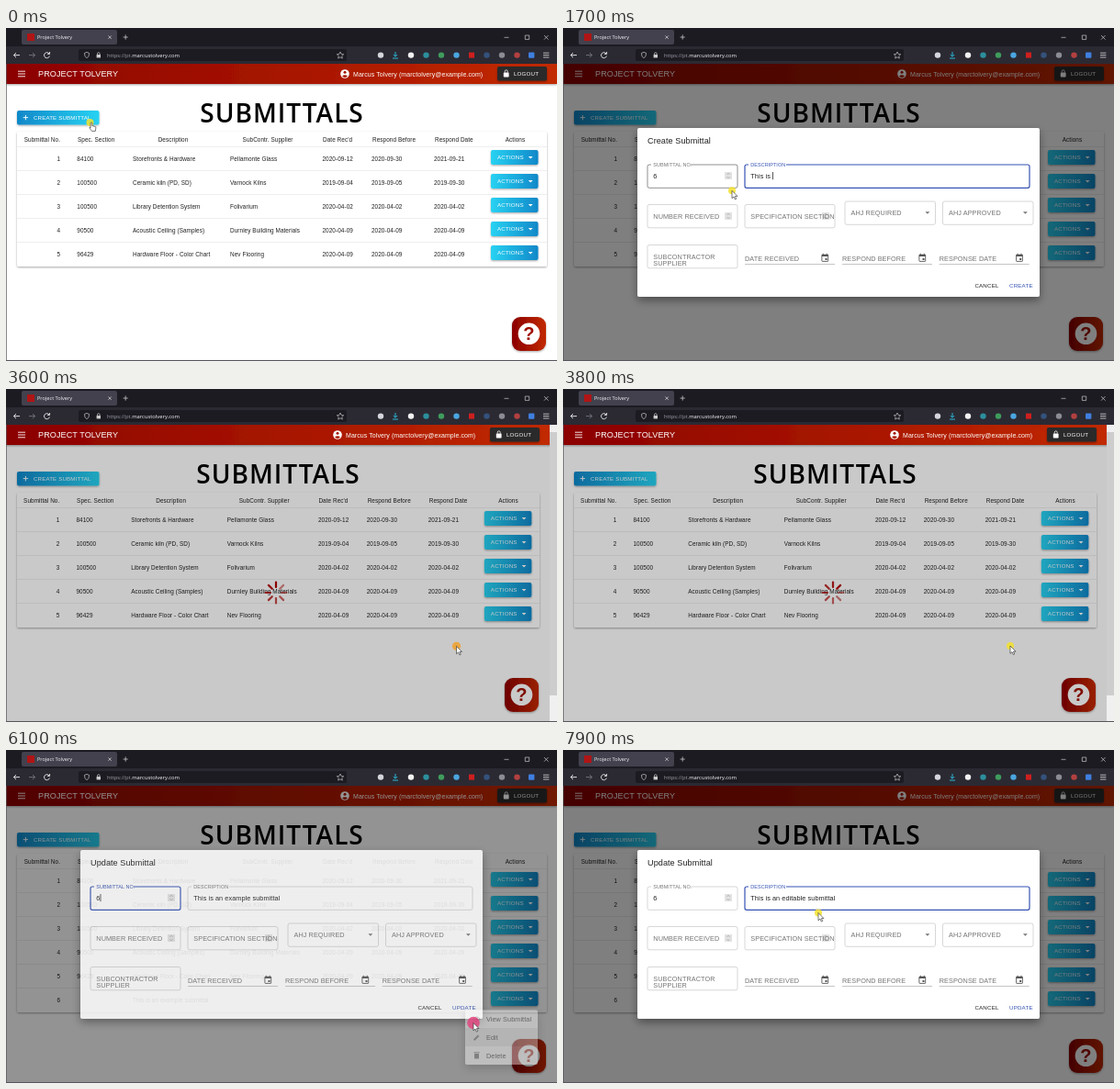
Animation, 600 px wide and 363 px high, one loop 8 s. Source, as an HTML page:

```html
<!DOCTYPE html>
<html lang="en">
<head>
<meta charset="utf-8">
<title>Submittals</title>
<style>
  html, body { margin: 0; width: 100%; height: 100%; overflow: hidden; background: #fff; }
  svg { display: block; width: 600px; height: 363px; }
  text { font-family: "Liberation Sans", Arial, sans-serif; white-space: pre; letter-spacing: .07px; }
  .chrome { font-family: "Open Sans", "Noto Sans", sans-serif; letter-spacing: 0; }
  .btn { letter-spacing: .18px; }
  .heading { font-family: "Open Sans", "Noto Sans", sans-serif; font-weight: 600; letter-spacing: 1px; }
</style>
</head>
<body>
<svg id="stage" viewBox="0 0 600 363">
  <defs>
    <linearGradient id="red"><stop stop-color="#8b0000"/><stop offset="1" stop-color="#c22a00"/></linearGradient>
    <linearGradient id="cyanBlue"><stop stop-color="#28d2f2"/><stop offset="1" stop-color="#1088c9"/></linearGradient>
    <linearGradient id="blueCyan"><stop stop-color="#1088c9"/><stop offset="1" stop-color="#28d2f2"/></linearGradient>
    <filter id="soft" x="-20%" y="-20%" width="140%" height="150%">
      <feDropShadow dx="0" dy="1" stdDeviation="1" flood-opacity=".35"/>
    </filter>
    <filter id="deep" x="-20%" y="-20%" width="140%" height="150%">
      <feDropShadow dx="0" dy="4" stdDeviation="5" flood-opacity=".4"/>
    </filter>
  </defs>
</svg>
<script>
const LOOP = 8000, STEP = 100;
const BLUE = '#3552b3', GREY = '#757575', INK = '#212121';
const stage = document.getElementById('stage');

function set(node, attrs) {
  for (const k in attrs) node.setAttribute(k, attrs[k]);
  return node;
}
function el(parent, tag, attrs = {}) {
  return parent.appendChild(set(document.createElementNS('http://www.w3.org/2000/svg', tag), attrs));
}
const group = (parent, attrs) => el(parent, 'g', attrs);
const box = (parent, x, y, width, height, fill, more) =>
  el(parent, 'rect', { x, y, width, height, fill, ...more });
const dot = (parent, cx, cy, r, fill, more) => el(parent, 'circle', { cx, cy, r, fill, ...more });
const path = (parent, d, stroke, width = 1, more) =>
  el(parent, 'path', { d, stroke, 'stroke-width': width, fill: 'none', ...more });
function label(parent, x, y, str, size, fill, more) {
  const t = el(parent, 'text', { x, y, 'font-size': size, fill, ...more });
  t.textContent = str;
  return t;
}
const show = (node, on) => node.setAttribute('visibility', on ? 'visible' : 'hidden');
const move = (node, x, y = 0) => node.setAttribute('transform', `translate(${x} ${y})`);
const MID = { 'text-anchor': 'middle' }, END = { 'text-anchor': 'end' };

const clamp = v => Math.max(0, Math.min(1, v));
const ramp = (t, from, to) => clamp((t - from) / (to - from));
const smooth = u => u * u * (3 - 2 * u);
const fade = (t, from, to) => smooth(ramp(t, from, to));
const mix = (a, b, u) => a + (b - a) * u;

// ---- page -------------------------------------------------------------
box(stage, 0, 0, 600, 363, '#fff');
const page = group(stage);
const heading = label(page, 300.5, 103, 'SUBMITTALS', 28, '#000', { class: 'heading', ...MID });

const create = group(page);
box(create, 12, 90, 89.5, 15.5, 'url(#blueCyan)', { rx: 2, filter: 'url(#soft)' });
path(create, 'M18.7 97.6h5.4M21.4 94.9v5.4', '#fff', .9);
label(create, 30, 100, 'CREATE SUBMITTAL', 6.1, '#fff', { class: 'btn' });

const sheet = box(page, 12, 113, 577, 147, '#fff', { rx: 2, filter: 'url(#soft)' });
const rules = Array.from({ length: 6 }, (_, i) => box(page, 12, 129.3 + i * 26, 577, .5, '#dcdcdc'));

const shifting = [];
function cell(parent, x, y, str, more) {
  shifting.push([x, label(parent, x, y, str, 6.4, INK, more)]);
}
[[59, 'Submittal No.', END], [78, 'Spec. Section'], [182, 'Description', MID], [285, 'SubContr. Supplier', MID],
 [345, "Date Rec'd"], [399, 'Respond Before'], [467, 'Respond Date'], [554.5, 'Actions', MID]]
  .forEach(([x, str, more]) => cell(page, x, 123.6, str, more));

const COLS = [59, 77.3, 138, 244, 344.5, 398, 466];
const ROWS = [
  '1|84100|Storefronts & Hardware|Pellamonte Glass|2020-09-12|2020-09-30|2021-09-21',
  '2|100500|Ceramic kiln (PD, SD)|Varnock Kilns|2019-09-04|2019-09-05|2019-09-30',
  '3|100500|Library Detention System|Folivarium|2020-04-02|2020-04-02|2020-04-02',
  '4|90500|Acoustic Ceiling (Samples)|Durnley Building Materials|2020-04-09|2020-04-09|2020-04-09',
  '5|96429|Hardware Floor - Color Chart|Nev Flooring|2020-04-09|2020-04-09|2020-04-09',
  '6||This is an example submittal'
];
const rows = ROWS.map((line, i) => {
  const g = group(page), y = 133 + i * 26;
  line.split('|').forEach((str, c) => cell(g, COLS[c], y + 12.2, str, c ? {} : END));
  const b = group(g);
  box(b, 528, y, 51.5, 16, 'url(#cyanBlue)', { rx: 2, filter: 'url(#soft)' });
  label(b, 535, y + 10.2, 'ACTIONS', 6.2, '#fff', { class: 'btn' });
  el(b, 'path', { d: `M568.8 ${y + 7}h4.8l-2.4 2.5z`, fill: '#fff' });
  shifting.push([528, b]);
  return g;
});

const help = group(page);
box(help, 551, 315, 37, 37, 'url(#red)', { rx: 9, filter: 'url(#soft)' });
dot(help, 569.5, 333.3, 11.8, '#fff');
label(help, 569.5, 340.3, '?', 20, '#a01000', { 'font-weight': 700, ...MID });

const loader = group(stage);
box(loader, 0, 61, 600, 302, '#000', { opacity: .21 });
const spokes = Array.from({ length: 8 }, (_, i) =>
  box(loader, 292.9, 209.5, 2.2, 7.6, '#8b0000', { rx: 1, transform: `rotate(${i * 45} 294 222)` }));

// ---- app bar ----------------------------------------------------------
box(stage, 0, 39, 600, 22, 'url(#red)', { filter: 'url(#soft)' });
path(stage, 'M13 47.2h8M13 50h8M13 52.8h8', '#fff', .9);
label(stage, 35, 53, 'PROJECT TOLVERY', 9.1, '#fff');
const account = group(stage);
dot(account, 369, 50, 4.8, '#fff');
dot(account, 369, 48.2, 1.5, '#a51600');
el(account, 'path', { d: 'M366 52.6q3-2.6 6 0q-3 2.8-6 0z', fill: '#a51600' });
label(account, 378, 52.6, 'Marcus Tolvery (marctolvery@example.com)', 7, '#fff');
box(account, 535, 42, 54, 15.6, '#2c2c2c', { rx: 2, filter: 'url(#soft)' });
box(account, 541.8, 48.4, 5.8, 5, '#fff', { rx: .6 });
path(account, 'M543.2 48.6v-1.3a1.5 1.5 0 0 1 3 0v1.3', '#fff', .8);
label(account, 553, 52.1, 'LOGOUT', 6.2, '#fff', { class: 'btn' });

const scrollbar = group(stage);
box(scrollbar, 592, 39, 8, 323, '#f0f0f0');
box(scrollbar, 592, 47, 8, 287, '#cdcdcd');

const dim = box(stage, 0, 39, 600, 324, '#000');

// ---- dialog -----------------------------------------------------------
const dialog = group(stage);
box(dialog, 81, 109, 438, 184, '#fff', { rx: 2, filter: 'url(#deep)' });
const caption = label(dialog, 92, 126.2, '', 9.1, INK);

const outline = (x, y, w) =>
  box(dialog, x, y, w, 25.3, 'none', { rx: 2, stroke: '#bdbdbd', 'stroke-width': .6 });
function spinner(x, y) {
  box(dialog, x, y - 4, 8, 8, '#e2e2e2');
  path(dialog, `M${x + 2.5} ${y - 1.2}l1.5-1.5 1.5 1.5M${x + 2.5} ${y + 1.2}l1.5 1.5 1.5-1.5`, '#888', .6);
}
function floating(x, y, w, str, notch) {
  const frame = outline(x, y, w);
  const gap = box(dialog, x + 4, y - 1.5, notch, 3, '#fff');
  const name = label(dialog, 0, 0, str, 7.3, GREY);
  const value = label(dialog, x + 6.3, y + 14.7, '', 7.3, INK);
  return (up, focused, hover, str) => {
    set(frame, {
      stroke: focused ? BLUE : hover ? '#444' : '#bdbdbd',
      'stroke-width': focused ? 1.2 : .6
    });
    gap.setAttribute('width', notch * up);
    set(name, {
      fill: focused ? BLUE : GREY,
      transform: `translate(${x + 6.3} ${y + mix(15, 2, up)}) scale(${mix(1, .75, up)})`
    });
    value.textContent = str;
    return value;
  };
}
const number = floating(92, 149, 98, 'SUBMITTAL NO.', 43);
spinner(176, 161);
const selection = box(dialog, 0, 156.5, 0, 9, '#9cc7f0');
const description = floating(198, 149, 310, 'DESCRIPTION', 41);

const hint = (x, y, str) => label(dialog, x, y, str, 7.3, GREY);
outline(92, 192.5, 98);
outline(198, 192.5, 98);
spinner(176, 205);
spinner(282, 205);
hint(98.3, 208, 'NUMBER RECEIVED');
hint(204.3, 208, 'SPECIFICATION SECTION');
[[307, 'AHJ REQUIRED'], [413.5, 'AHJ APPROVED']].forEach(([x, str]) => {
  outline(x, 189, 98.5);
  hint(x + 6.5, 204.2, str);
  el(dialog, 'path', { d: `M${x + 87.5} 200.3h4.8l-2.4 2.5z`, fill: GREY });
});
outline(92, 236.5, 98);
hint(98.3, 251.5, 'SUBCONTRACTOR');
hint(98.3, 258.7, 'SUPPLIER');
[[198, 'DATE RECEIVED'], [304, 'RESPOND BEFORE'], [409.7, 'RESPONSE DATE']].forEach(([x, str]) => {
  hint(x, 253.6, str);
  box(dialog, x, 257.3, 98, .5, '#8a8a8a');
  const c = x + 87.3;
  box(dialog, c - 3.4, 247.2, 6.8, 7.2, 'none', { stroke: '#555', 'stroke-width': .9, rx: .5 });
  box(dialog, c - 3.4, 247, 6.8, 2, '#555');
  path(dialog, `M${c - 2} 245.8v1.5M${c + 2} 245.8v1.5`, '#555', .9);
  box(dialog, c + .2, 251, 2, 2, '#555');
});
label(dialog, 448.4, 283.4, 'CANCEL', 6.2, INK, { class: 'btn' });
const confirm = label(dialog, 486, 283.4, '', 6.2, BLUE, { class: 'btn' });
const caret = box(dialog, 0, 157, .7, 8.2, '#111');

// ---- row menu ---------------------------------------------------------
const menu = group(stage);
box(menu, 500, 283.5, 79, 59.5, '#fff', { rx: 2, filter: 'url(#deep)' });
const picked = box(menu, 500, 303, 79, 20, '#e6e6e6');
path(menu, 'M508.5 293.3q3.9-4.6 7.8 0q-3.9 4.6-7.8 0z', '#666', .9);
dot(menu, 512.4, 293.3, 1.3, '#666');
path(menu, 'M509.6 316.2l5-5', '#666', 2);
box(menu, 510, 331, 5, 5.5, '#666', { rx: .6 });
box(menu, 509.4, 329.3, 6.2, 1, '#666');
['View Submittal', 'Edit', 'Delete'].forEach((str, i) => label(menu, 523, 295.8 + i * 20, str, 7.3, INK));

// ---- browser frame ----------------------------------------------------
const frame = group(stage);
box(frame, 0, 0, 600, 20, '#1c1b22');
box(frame, 0, 20, 600, 19, '#2b2a33');
box(frame, 17, 2, 104, 16, '#42414d', { rx: 2 });
box(frame, 23, 6, 8, 8, '#b01515');
label(frame, 34, 12.2, 'Project Tolvery', 5.6, '#f4f4f8', { class: 'chrome' });
path(frame, 'M111.4 8.4l3.4 3.4M114.8 8.4l-3.4 3.4M127.6 10h5.2M130.2 7.4v5.2', '#ddd', .7);
path(frame, 'M542.5 10.3h5M565.3 8h4.4v4.4h-4.4zM586 8l4.6 4.6M590.6 8l-4.6 4.6', '#ccc', .7);
path(frame, 'M15 29.6H8.4M11 27l-2.6 2.6L11 32.2', '#eee', .9);
path(frame, 'M25 29.6h6.6M29 27l2.6 2.6L29 32.2', '#77767f', .9);
path(frame, 'M47 28a3 3 0 1 0 .4 2.6M47.6 26v2.4h-2.4', '#eee', .9);
box(frame, 79, 23, 292, 13, '#1c1b22', { rx: 2 });
path(frame, 'M88 26.4l2.6 1q0 4-2.6 5.4q-2.6-1.4-2.6-5.4z', '#ccc', .7);
box(frame, 98.6, 29, 4.4, 3.4, '#ccc');
path(frame, 'M99.5 29v-1a1.3 1.3 0 0 1 2.6 0v1', '#ccc', .7);
const url = label(frame, 110, 31.7, '', 5.85, '#a3a2ab', { class: 'chrome' });
el(url, 'tspan').textContent = 'https://pt.';
el(url, 'tspan', { fill: '#fbfbfe' }).textContent = 'marcustolvery.com';
path(frame, 'M364 26l1.1 2.4 2.6.3-1.9 1.8.5 2.6-2.3-1.3-2.3 1.3.5-2.6-1.9-1.8 2.6-.3z', '#ddd', .6);
path(frame, 'M424 26v5M421.8 29l2.2 2.2 2.2-2.2M421 33h6', '#2cc7e8', .9);
['#d5d5dc', '', '#f2f2f2', '#2c8f9c', '#3f9c5c', '#4aa6e0', '', '#34527c', '#8c8c94', '#b34040']
  .forEach((c, i) => c && dot(frame, 408 + i * 16.5, 29.6, 3.2, c));
box(frame, 504, 26.6, 6, 6, '#cf1f1f');
box(frame, 569, 26.4, 6.4, 6.4, '#3f7fe0', { rx: 1 });
path(frame, 'M585 27.2h6.4M585 29.6h6.4M585 32h6.4', '#ddd', .8);
box(frame, 0, 39, .7, 324, '#55555c');
box(frame, 0, 362, 600, 1, '#55555c');

// ---- pointer ----------------------------------------------------------
const pointer = group(stage);
const halo = dot(pointer, 0, 0, 4, '#f4e22a');
const LINE = { stroke: '#222', 'stroke-width': .6, fill: '#fff', 'stroke-linejoin': 'round' };
const arrow = el(pointer, 'path', { d: 'M0 0V8.4L2 6.6 3.4 9.6 4.7 9 3.4 6.1H6z', ...LINE });
const hand = el(pointer, 'path', {
  d: 'M1.3 0q.9-.2 1 .8v2.8l3.2.8q1 .3.9 1.4l-.6 3.6H2L-.6 6q-.2-1 .8-.6l.4.4V.8q0-.8.7-.8z', ...LINE
});

const PATH = [
  [0, 91.5, 103], [300, 69, 94.5], [700, 68, 94], [900, 75, 100], [1200, 120, 150], [1600, 184, 177.3],
  [2800, 184, 177.3], [3100, 380, 250], [3300, 497, 281], [3800, 487, 280], [4500, 478, 281],
  [4800, 390, 296], [5000, 313, 305], [5100, 313, 305], [5300, 550, 271], [5400, 553, 271],
  [5700, 530, 312], [5900, 526, 312], [6100, 509, 297.5], [6600, 258, 163], [6900, 256, 162],
  [7200, 278, 177.5], [8000, 278, 177.5]
];
const CLICKS = [400, 3300, 5000, 5300, 5900, 6600, 6700];

function pointerAt(t) {
  const i = Math.max(1, PATH.findIndex(p => p[0] > t));
  const [a, b] = [PATH[i - 1], PATH[i]], u = fade(t, a[0], b[0]);
  return [mix(a[1], b[1], u), mix(a[2], b[2], u)];
}

// ---- description typing -----------------------------------------------
const PRE = 'This is an ', OLD = 'example', NEW = 'editable', POST = ' submittal';
const typed = (str, t, from, to) => str.slice(0, Math.round(str.length * ramp(t, from, to)));

function descriptionAt(t) {
  if (t < 5000) {
    const text = typed(PRE + OLD + POST, t, 1300, 2700);
    return { text, at: text.length };
  }
  if (t < 6900) return { text: PRE + OLD + POST, at: PRE.length + OLD.length };
  const word = typed(NEW, t, 6800, 7400);
  return { text: PRE + word + POST, at: PRE.length + word.length };
}
const widthTo = (node, n) => n ? node.getSubStringLength(0, n) : 0;

function drawDialog(t) {
  const update = t > 5000;
  const open = update ? fade(t, 5930, 6155) : fade(t, 450, 675) * (1 - fade(t, 3350, 3550));
  dim.setAttribute('opacity', open * .5);
  dialog.setAttribute('opacity', open);
  show(dialog, open > 0);
  if (!open) return;

  caption.textContent = (update ? 'Update' : 'Create') + ' Submittal';
  confirm.textContent = update ? 'UPDATE' : 'CREATE';
  const switchAt = update ? 6600 : 1300, onNumber = t < switchAt;
  const { text, at } = descriptionAt(t);
  const numText = update || t >= 1100 ? '6' : '';
  const num = number(update ? 1 : ramp(t, 450, 650), onNumber, !update && t >= 1500, numText);
  const desc = description(update ? 1 : ramp(t, 1300, 1500), !onNumber, false, text);

  const selecting = update && t >= 6700 && t < 6900;
  const left = 204.3 + widthTo(desc, selecting ? PRE.length : 0);
  set(selection, { x: left, width: selecting ? 204.3 + widthTo(desc, at) - left : 0 });

  const since = update ? (onNumber ? 5930 : t < 7400 ? t : 7400)
                       : onNumber ? 450 : Math.min(t, 2700);
  show(caret, !selecting && (t - since) % 1000 < 500);
  caret.setAttribute('x', onNumber ? 98.5 + widthTo(num, numText.length) : 204.5 + widthTo(desc, at));
}

function drawPage(t) {
  const loading = t >= 3550 && t < 4500, saved = t >= 4500;
  const narrow = loading ? 8 : 0;
  shifting.forEach(([x, node]) => move(node, -(x - 12) * narrow / 577));
  move(heading, -narrow / 2);
  move(account, -narrow);
  move(help, -narrow);
  rules.forEach((r, i) => {
    r.setAttribute('width', 577 - narrow);
    show(r, i < 5 || saved);
  });
  set(sheet, { width: 577 - narrow, height: saved ? 173 : 147 });
  show(rows[5], saved);
  show(loader, loading);
  show(scrollbar, loading);
  spokes.forEach((s, i) => s.setAttribute('opacity', 1 - .6 * ((t / 1200 + 1 - i / 8) % 1)));
}

function drawMenu(t) {
  const grow = fade(t, 5320, 5570), scale = mix(.8, 1, grow);
  set(menu, {
    opacity: grow * (1 - fade(t, 5930, 6230)),
    transform: `translate(540 284) scale(${scale}) translate(-540 -284)`
  });
  show(picked, t >= 5600);
}

function drawPointer(t) {
  move(pointer, ...pointerAt(t));
  const age = t - Math.max(-1000, ...CLICKS.filter(c => c <= t));
  const [fill, r] = age < 250 ? ['#e0457f', 6.8] : age < 350 ? ['#f0a02c', 4.6] : ['#f4e22a', 4];
  set(halo, { fill, r, opacity: .85 });
  const onButton = t < 500 || (t >= 3300 && t < 3500) || (t >= 5300 && t < 6000);
  show(hand, onButton);
  show(arrow, !onButton);
}

const start = performance.now();
function tick() {
  const t = Math.floor((performance.now() - start) % LOOP / STEP) * STEP;
  drawPage(t);
  drawDialog(t);
  drawMenu(t);
  drawPointer(t);
  requestAnimationFrame(tick);
}
tick();
</script>
</body>
</html>
```
